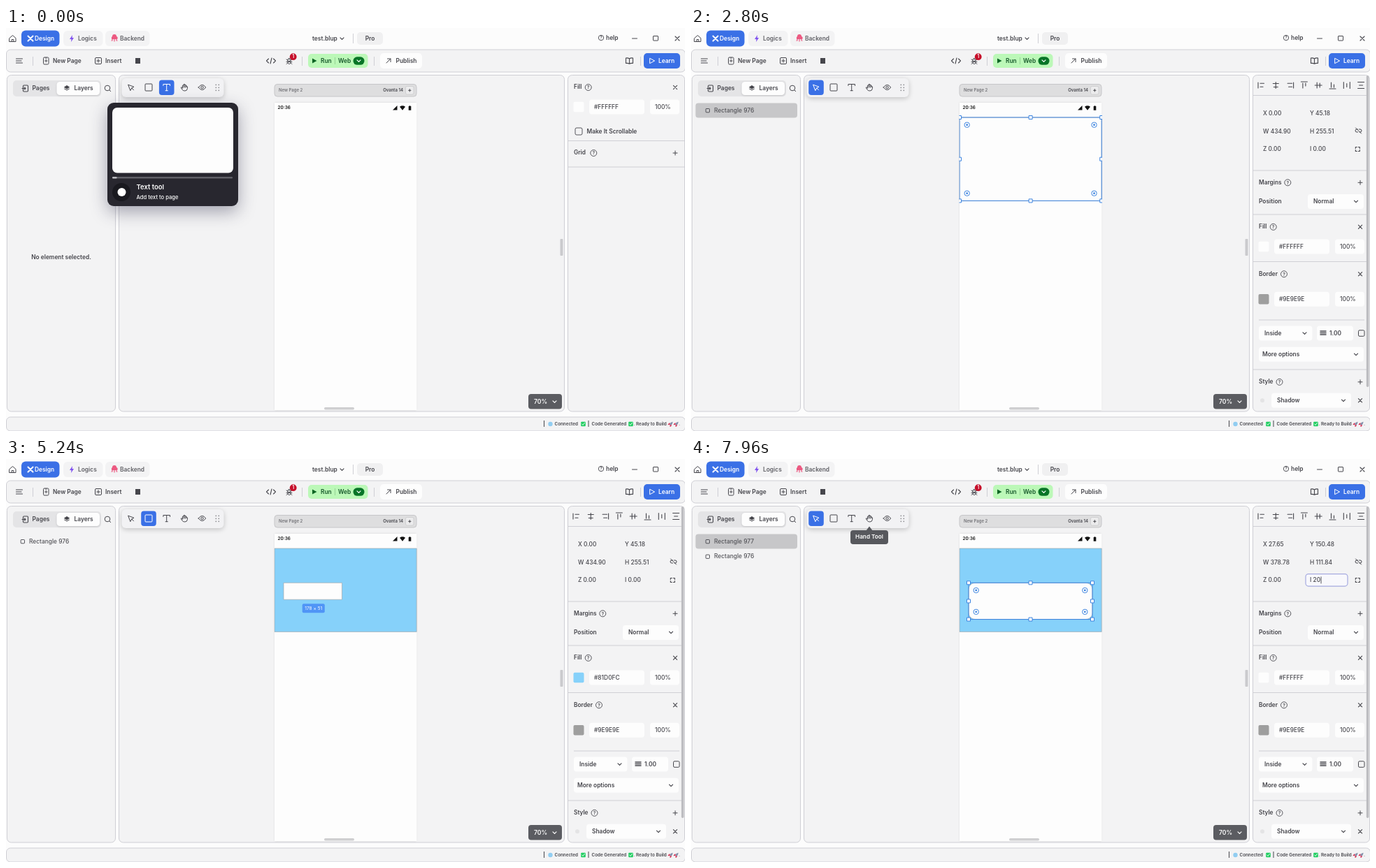
An HTML page with a canvas that plays this animation: 971 by 577 pixels, repeating every 8 s.

```html
<!DOCTYPE html>
<html lang="en">
<head>
<meta charset="utf-8">
<title>Page editor</title>
<style>
html, body { margin: 0; width: 100%; height: 100%; overflow: hidden; background: #fcfcfc; }
canvas { display: block; width: 971px; height: 577px; }
</style>
</head>
<body>
<canvas id="stage"></canvas>
<script>
const W = 971, H = 577, LOOP = 8000, UNIT = 0.4673;
const INK = '#46464c', BLUE = '#3a70e6', SELECT = '#3d84df', LINE = '#cfcfd5', PANEL = '#f3f3f4';
const WHITE = '#fdfdfd', SKY = '#86d1fa', GREY = '#9e9e9e';
const canvas = document.getElementById('stage');
const ctx = canvas.getContext('2d');
const ratio = window.devicePixelRatio || 1;
canvas.width = W * ratio;
canvas.height = H * ratio;

function box(x, y, w, h, r, fill, stroke, lw = 1) {
  ctx.beginPath();
  ctx.roundRect(x, y, w, h, r);
  if (fill) { ctx.fillStyle = fill; ctx.fill(); }
  if (stroke) { ctx.strokeStyle = stroke; ctx.lineWidth = lw; ctx.stroke(); }
}
function raised(blur, dy, color, draw) {
  ctx.save();
  ctx.shadowBlur = blur * ratio;
  ctx.shadowOffsetY = dy * ratio;
  ctx.shadowColor = color;
  draw();
  ctx.restore();
}
function disc(x, y, r, fill, stroke, lw = 1) { box(x - r, y - r, 2 * r, 2 * r, r, fill, stroke, lw); }
function text(s, x, y, size = 8.4, color = INK, weight = 600, align = 'left') {
  ctx.font = `${weight} ${size}px Inter, sans-serif`;
  ctx.fillStyle = color;
  ctx.textAlign = align;
  ctx.textBaseline = 'middle';
  ctx.fillText(s, x, y);
}
// Icons are SVG paths relative to (x, y).
function icon(x, y, d, color = INK, lw = 1, filled = false) {
  ctx.save();
  ctx.translate(x, y);
  ctx.lineCap = ctx.lineJoin = 'round';
  const path = new Path2D(d);
  if (filled) { ctx.fillStyle = color; ctx.fill(path); }
  else { ctx.strokeStyle = color; ctx.lineWidth = lw; ctx.stroke(path); }
  ctx.restore();
}
const rule = (x, y, w, h, color = LINE) => { ctx.fillStyle = color; ctx.fillRect(x, y, w, h); };
const chevron = (x, y, color) => icon(x, y, 'M-2.5-1.2L0 1.3L2.5-1.2', color, 1.2);
const cross = (x, y, s = 2.6) => icon(x, y, `M${-s} ${-s}L${s} ${s}M${s} ${-s}L${-s} ${s}`, INK, 1.1);
const plus = (x, y, s = 3) => icon(x, y, `M${-s} 0H${s}M0 ${-s}V${s}`, INK, 1);
const play = (x, y, color, filled) => icon(x, y, 'M-3-3.5L3.5 0L-3 3.5Z', color, 1, filled);
function question(x, y, r = 4.5) {
  disc(x, y, r, null, INK, 0.9);
  text('?', x, y + 0.2, r * 1.5, INK, 600, 'center');
}

function titleBar() {
  icon(9.5, 15, 'M-4.5-.5L0-4.5L4.5-.5V4.5H-4.5ZM-1.3 4.5V1.5H1.3V4.5');
  box(22, 3.5, 54.5, 23, 6, BLUE);
  icon(35, 15, 'M-3.5-3.5L3.5 3.5M3.5-3.5L-3.5 3.5', '#fff', 2);
  text('Design', 41, 15, 8.4, '#fff');
  box(82, 4, 56.5, 22, 6, PANEL);
  icon(94, 15, 'M1-5L-3 1H-.5L-1 5L3-1H.5Z', '#8052ef', 1, true);
  text('Logics', 103, 15, 8.4, '#606066');
  box(142, 4, 63.5, 22, 6, PANEL);
  icon(155, 15, 'M-4 0A2.5 2.5 0 0 1-3-3A3 3 0 0 1 3-3A2.4 2.4 0 0 1 4 1H-4Z', '#ec5a82', 1, true);
  icon(155, 15, 'M0 0V4M-3 1V3H-4M3 1V3H4', '#ec5a82', 1.2);
  text('Backend', 163, 15, 8.4, '#606066');
  text('test.blup', 438, 15);
  chevron(480.5, 15);
  rule(496, 8, 1, 14);
  box(502, 6, 37, 18, 5, '#f0f0f1');
  text('Pro', 520.5, 15, 8.4, INK, 600, 'center');
  question(851, 14, 3.7);
  text('help', 858, 14);
  icon(899, 15, 'M-3.5 0H3.5');
  box(925.5, 11.5, 7, 6.5, 0.5, null, INK);
  cross(960, 15, 3);
}

function toolbar() {
  box(0.5, 31, 971, 32, 6, PANEL, LINE);
  icon(19, 47, 'M-4.5-3H4.5M-4.5 0H3M-4.5 3H4.5', INK, 1.1);
  [38, 423, 526, 907].forEach(x => rule(x, 41, 1, 13));
  box(53.5, 42, 7.5, 10, 1.5, null, INK);
  icon(57.3, 47, 'M-1.8 0H1.8M0-1.8V1.8M-1-4H1', INK, 0.9);
  text('New Page', 67, 47);
  box(127.5, 42.5, 9, 9, 1.5, null, INK);
  plus(132, 47, 2.3);
  text('Insert', 142, 47);
  box(185, 43, 7, 8, 0, INK);
  icon(379, 47, 'M-3.5-3L-6.5 0L-3.5 3M3.5-3L6.5 0L3.5 3M1-4L-1 4', INK, 1.1);
  icon(405, 47.5, 'M-2-2.5H2V2A2 2 0 0 1-2 2ZM-4-2.5L-2-1M4-2.5L2-1M-4 1H4M-4 4L-2 2.5M4 4L2 2.5M-1-4H1M-1 0H1', INK, 0.9);
  disc(410.7, 41.2, 4.9, '#c60f2a');
  text('1', 410.7, 41.3, 7, '#fff', 600, 'center');
  box(432, 37, 85.5, 20, 5, '#bcf8b8');
  play(441, 47, '#0d6524', true);
  text('Run', 450, 47, 8.4, '#17592b');
  rule(470, 42, 0.8, 10, '#8ccb8c');
  text('Web', 475, 47, 8.4, '#17592b');
  box(496.5, 41.3, 16, 11.5, 5.7, '#087527');
  chevron(504.5, 47, '#fff');
  box(535, 36, 60, 22, 5, WHITE);
  icon(547, 47, 'M-3 3L3-3M-1.5-3H3V1.5');
  text('Publish', 557.5, 47);
  icon(891.5, 47, 'M0-3Q-2-4.5-5-4V3.5Q-2 3 0 4.3Q2 3 5 3.5V-4Q2-4.5 0-3V4', INK, 1.1);
  box(912, 36, 52, 22, 5, BLUE);
  play(924, 47, '#fff');
  text('Learn', 933, 47, 8.4, '#fff');
}

function layerPanel(s) {
  box(1.5, 67.5, 155, 481.5, 6, PANEL, LINE);
  box(10, 75, 126, 23, 5, '#e4e4e6');
  raised(3, 1, '#0002', () => box(72.5, 77, 61.5, 19, 4.5, WHITE));
  box(24.5, 82, 7, 9, 1.2, null, INK, 1.1);
  icon(27, 86.5, 'M-4 0H1M-.5-1.5L1 0L-.5 1.5', INK, 1.1);
  text('Pages', 37.5, 86.3);
  icon(87, 86, 'M0-4L4.2-1.3L0 1.4L-4.2-1.3ZM-4.2 1L0 3.6L4.2 1L3.2.4L0 2.4L-3.2.4Z', INK, 1, true);
  text('Layers', 97.5, 86.3);
  disc(145, 86, 3.8, null, INK);
  icon(148, 89, 'M0 0L1.7 1.7');
  if (!s.layers.length) text('No element selected.', 79, 328, 8.4, INK, 600, 'center');
  s.layers.forEach((name, i) => {
    const y = 118 + i * 21.6;
    if (i === 0 && s.selected) box(6.5, y - 10.5, 145.5, 21, 4, '#c7c7c9');
    box(21.2, y - 2.5, 5.3, 5.3, 0.8, null, INK, 0.9);
    text(name, 33, y, 8.4, '#55555a', 500);
  });
}

const toolX = { arrow: 179, rect: 204, type: 229.7, hand: 255, eye: 280.5 };
function tools(active) {
  raised(7, 2, '#0003', () => box(165.5, 72, 146, 27, 6, '#f2f2f4'));
  box(toolX[active] - 10.8, 74.5, 21.6, 21.5, 4, BLUE);
  const tint = name => name === active ? '#fff' : INK;
  icon(toolX.arrow, 85.3, 'M-4-4L4-1L.7.7L-1 4ZM.7.7L3.5 3.5', tint('arrow'));
  box(toolX.rect - 5, 80, 10, 10, 1, null, tint('rect'), 1);
  icon(toolX.type, 85, 'M-4.8-2.5V-4.5H4.8V-2.5M0-4.5V4.7M-1.6 4.7H1.6', tint('type'));
  icon(toolX.hand, 85, 'M-2.6 1V-2.6Q-1.8-4-.9-2.8V-4.2Q0-5.4.9-4.2V-3.2Q2-4.4 2.6-3V-1.5Q4-2.3 4.5-1V1.5Q4 5 .8 5Q-2 5-3.2 3L-4.8.2Q-4-1-2.6 1M-.9-2.8V0M.9-3V0M2.6-2V0', tint('hand'));
  icon(toolX.eye, 85, 'M-5.2 0Q0-7.4 5.2 0Q0 7.4-5.2 0Z', tint('eye'));
  disc(toolX.eye, 85, 1.7, null, tint('eye'));
  for (let i = 0; i < 6; i++) disc(300.3 + i % 2 * 4, 81.3 + (i >> 1) * 4, 0.9, '#8c8c91');
}

function selection({ x, y, w, h }) {
  box(x, y, w, h, 0, null, SELECT);
  for (const u of [0, 0.5, 1]) for (const v of [0, 0.5, 1]) {
    if (u === 0.5 && v === 0.5) continue;
    box(x + w * u - 2.5, y + h * v - 2.5, 5, 5, 0, '#fff', SELECT);
  }
  for (const cx of [x + 10.7, x + w - 10.7]) for (const cy of [y + 10.7, y + h - 10.7]) {
    disc(cx, cy, 3.7, '#fff', SELECT);
    disc(cx, cy, 1.4, SELECT);
  }
}
function sizeLabel(r) {
  const label = `${Math.floor(r.w / UNIT + 0.02)} × ${Math.floor(r.h / UNIT + 0.02)}`;
  ctx.font = '400 6.6px Inter, sans-serif';
  const w = ctx.measureText(label).width + 7, cx = r.x + r.w / 2 + 1;
  box(cx - w / 2, r.y + r.h + 6, w, 13, 2, '#5095f6');
  text(label, cx, r.y + r.h + 12.6, 6.6, '#fff', 400, 'center');
}

function workspace(s) {
  box(161.5, 67.5, 637, 481.5, 6, PANEL, LINE);
  box(384, 80.5, 203, 17.5, 4, '#dededf', '#c6c6c9');
  text('New Page 2', 390, 89.3, 6, '#66666b', 500);
  text('Ovanta 14', 568, 89.3, 6, INK, 600, 'right');
  box(571.5, 83.5, 11.5, 11.5, 2, '#ececed', '#c9c9cc', 0.8);
  plus(577.3, 89.3, 1.7);
  raised(3, 0, '#0002', () => box(384, 107, 203.4, 440, 0, WHITE));
  text('20:36', 388.5, 114, 6.4, '#111', 600);
  icon(556.5, 114.5, 'M-3.5 3H3V-3.5Z', '#111', 1, true);
  icon(567, 114.5, 'M-4-1.7Q0-4.6 4-1.7L0 3.2Z', '#111', 1, true);
  icon(577.5, 114.5, 'M-1.8-2.5H-.8V-3.3H.8V-2.5H1.8V3.2H-1.8Z', '#111', 1, true);
  ctx.save();
  ctx.beginPath();
  ctx.rect(383.5, 107, 204.5, 440);
  ctx.clip();
  s.shapes.forEach(r => box(r.x, r.y, r.w, r.h, r.radius || 0, r.fill, GREY, 0.6));
  if (s.selected) selection(s.selected);
  if (s.drag) sizeLabel(s.drag);
  ctx.restore();
  box(455, 543, 43, 3.5, 1.7, '#cfcfd1');
  box(792.5, 302, 4, 24, 1, '#cacacd');
  box(747, 524, 48, 21.5, 4, '#5b5c61');
  text('70%', 755, 535, 8.6, '#fff');
  chevron(784.5, 535, '#fff');
  tools(s.tool);
}

function colorRow(y, color, hex, focused) {
  box(811.5, y - 7.3, 15, 14.6, 2, color);
  if (focused) raised(3, 0, '#8888dd77', () => box(834.5, y - 10, 78.5, 20, 4, WHITE, '#a9a9d9'));
  else box(834, y - 10.5, 79, 21, 4, WHITE);
  text(hex, 841, y, 8.4, INK, 500);
  box(921, y - 10.5, 42, 21, 4, WHITE);
  text('100%', 928, y, 8.4, INK, 500);
}
function heading(label, y, qx, mark) {
  text(label, 812, y, 8.3);
  question(qx, y);
  mark(957, y);
}
function dropdown(label, x, y, w, pad = 8) {
  box(x, y - 10.5, w, 21, 4, WHITE);
  text(label, x + pad, y);
  chevron(x + w - 11, y);
}
function pagePanel() {
  heading('Fill', 85, 832.7, cross);
  colorRow(113, WHITE, '#FFFFFF');
  box(814, 143, 10, 10, 2, null, INK, 0.9);
  text('Make It Scrollable', 830.5, 148);
  rule(804, 161, 167, 1);
  heading('Grid', 179, 840.3, plus);
  rule(804, 198.5, 167, 1);
}
function elementPanel(s) {
  const bars = 'M-2-2.8H3.5M-2 2.2H2';
  const aligns = ['M-5-4V4' + bars, 'M0-4.5V4.5M-4-2.5H4M-3 2.5H3', 'M5-4V4M-3.5-2.8H3M-2 2.2H3',
    'M-4.5-5H4.5M-2-3V4M2-3V1', 'M-5 0H5M-2-4V4M2-3V3', 'M-4.5 5H4.5M-2-4V3M2-1V3',
    'M-4.5-4.5V4.5M4.5-4.5V4.5M0-2.5V2.5', 'M-4.5-4.5H4.5M-4.5 4.5H4.5M-2.5 0H2.5'];
  aligns.forEach((d, i) => icon(816 + i * 20.3, 82, d, INK, 1.1));
  [96, 203.5, 266.5, 334, 488.5].forEach(y => rule(804, y, 163, 1));
  const [x, y, w, h] = s.values;
  [['X', x, 'Y', y], ['W', w, 'H', h], ['Z', '0.00', 'I', s.inset]].forEach(([a, av, b, bv], i) => {
    const cy = 122.8 + i * 25.3;
    if (i === 2 && s.insetFocus) box(879, cy - 8.8, 60, 17.5, 4, '#f8f8fc', '#a6abe0', 1.2);
    text(`${a} ${av}`, 818, cy, 8.4, INK, 500);
    text(`${b} ${bv}`, 885, cy, 8.4, INK, 500);
    if (i === 2 && s.insetFocus) rule(885.5 + ctx.measureText(`${b} ${bv}`).width, cy - 5, 0.9, 10, INK);
  });
  icon(954.5, 147, 'M-1-2H-2.5A2 2 0 0 0-2.5 2H-1M1-2H2.5A2 2 0 0 1 2.5 2H1.5M-4-4L4 4');
  icon(953.3, 173.5, 'M-3-1V-3H-1M1-3H3V-1M3 1V3H1M-1 3H-3V1', INK, 1.1);
  heading('Margins', 221.3, 853.3, plus);
  text('Position', 812, 248.4);
  dropdown('Normal', 882, 248.4, 80);
  heading('Fill', 284.8, 832.7, cross);
  colorRow(313, s.fill, s.hex, s.hexFocus);
  heading('Border', 352.3, 848, cross);
  colorRow(388.3, GREY, '#9E9E9E');
  rule(812, 417.5, 151, 1);
  dropdown('Inside', 812, 437, 76.5);
  box(895, 426.5, 52, 21, 4, WHITE);
  icon(904, 437, 'M-4-3H4M-4-.5H4M-4 2H4', INK, 1.5);
  text('1.00', 913, 437);
  box(954.5, 432.8, 8.5, 8.5, 1.5, null, INK);
  dropdown('More options', 812, 467.3, 150, 5);
  heading('Style', 506.8, 841.5, plus);
  disc(817, 533.3, 3, '#e4e4e5');
  dropdown('Shadow', 830, 533.3, 114);
  cross(957, 533.3);
  box(965.8, 68, 3.6, 446, 1.8, '#bdbdc1');
}

function statusBar() {
  box(0.5, 557, 971, 20, 6, PANEL, LINE);
  const tick = x => {
    box(x - 3.3, 563.7, 6.6, 6.6, 1, '#21ce62');
    icon(x, 567, 'M-1.7 0L-.5 1.5L2-1.7', '#fff', 0.9);
  };
  const rocket = x => {
    icon(x, 567, 'M3.2-3.3Q0-3-1.7.2L.1 2Q3-.2 3.2-3.3Z', '#8290aa', 1, true);
    icon(x, 567, 'M-1.5-1L-3.3.7L-1.7.4M.8 1.8L-.5 3.3V1.5', '#d93154', 1.2);
  };
  rule(769, 562, 1, 9, INK);
  disc(778.5, 567, 3.2, '#91cdf1');
  text('Connected', 784.5, 567, 6.3);
  tick(825.5);
  rule(832.5, 562, 1, 9, INK);
  text('Code Generated', 837.5, 567, 6.3);
  tick(893.5);
  text('. Ready to Build', 897.5, 567, 6.3);
  rocket(950.5);
  rocket(958.5);
  text('.', 962, 567, 6.3);
}

function textTip(t) {
  raised(24, 8, '#28284566', () => box(145, 107, 187, 148, 9, '#28272f'));
  box(152, 114, 173, 93.5, 7, WHITE);
  box(152, 213, 172, 2.4, 1.2, '#606067');
  box(152, 213, 6.5 + t * 0.02, 2.4, 1.2, '#b9b9be');
  disc(165, 235, 13, '#19191f');
  disc(165.5, 235, 6, '#fff');
  text('Text tool', 186.5, 228, 9.5, '#fff');
  text('Add text to page', 186.5, 243, 7.6, '#fff', 500);
}
function handTip() {
  icon(255, 99, 'M-5 4L0-2.5L5 4Z', '#57585d', 1, true);
  box(228, 102, 54, 20, 4, '#57585d');
  text('Hand Tool', 255, 112, 8.2, '#fff', 600, 'center');
}

function draggedRect(t, start, length, full) {
  const p = Math.min(1, (t - start) / length), e = 1 - (1 - p) ** 2.3;
  return { ...full, w: full.w * Math.min(1, e * 1.03), h: full.h * e };
}
const hero = { x: 384, y: 128, w: 434.9 * UNIT, h: 255.51 * UNIT };
const card = { x: 397, y: 177.3, w: 378.78 * UNIT, h: 111.84 * UNIT, fill: WHITE };

function stateAt(t) {
  const between = (a, b) => t >= a && t < b;
  const colored = t >= 3360, second = t >= 5920;
  const s = { shapes: [], layers: [], tool: 'arrow', inset: '0.00' };
  if (t < 480) s.tool = 'type';
  else if (t < 2000 || between(4400, 6040)) s.tool = 'rect';

  if (between(960, 2000)) {
    s.drag = draggedRect(t, 960, 940, { ...hero, fill: WHITE });
    s.shapes.push(s.drag);
  }
  if (t >= 2000) {
    s.shapes.push({ ...hero, fill: colored ? SKY : WHITE });
    s.layers.push('Rectangle 976');
    if (t < 5040) s.selected = hero;
  }
  if (between(5040, 6040)) {
    s.drag = draggedRect(t, 5040, 860, card);
    s.shapes.push(s.drag);
  }
  if (second) s.layers.unshift('Rectangle 977');
  if (t >= 6040) {
    s.inset = t < 7160 ? '0.00' : t < 7320 ? '' : t < 7480 ? '2' : '20';
    s.insetFocus = t >= 6920;
    s.shapes.push({ ...card, radius: t < 7160 ? 0 : Number(s.inset) * UNIT });
    s.selected = card;
  }
  s.values = second ? ['27.65', '150.48', '378.78', '111.84'] : ['0.00', '45.18', '434.90', '255.51'];
  s.fill = colored && !second ? SKY : WHITE;
  s.hex = colored && !second ? '#81D0FC' : '#FFFFFF';
  s.hexFocus = between(2960, 4240);
  return s;
}

function render(t) {
  const s = stateAt(t);
  ctx.setTransform(ratio, 0, 0, ratio, 0, 0);
  rule(0, 0, W, H, '#fcfcfc');
  titleBar();
  toolbar();
  workspace(s);
  layerPanel(s);
  box(803.5, 67.5, 167, 481.5, 6, PANEL, LINE);
  if (s.layers.length) elementPanel(s);
  else pagePanel();
  statusBar();
  if (t < 400) textTip(t);
  if (t >= 7840) handTip();
}

const began = performance.now();
function tick() {
  render((performance.now() - began) % LOOP);
  requestAnimationFrame(tick);
}
tick();
</script>
</body>
</html>
```
